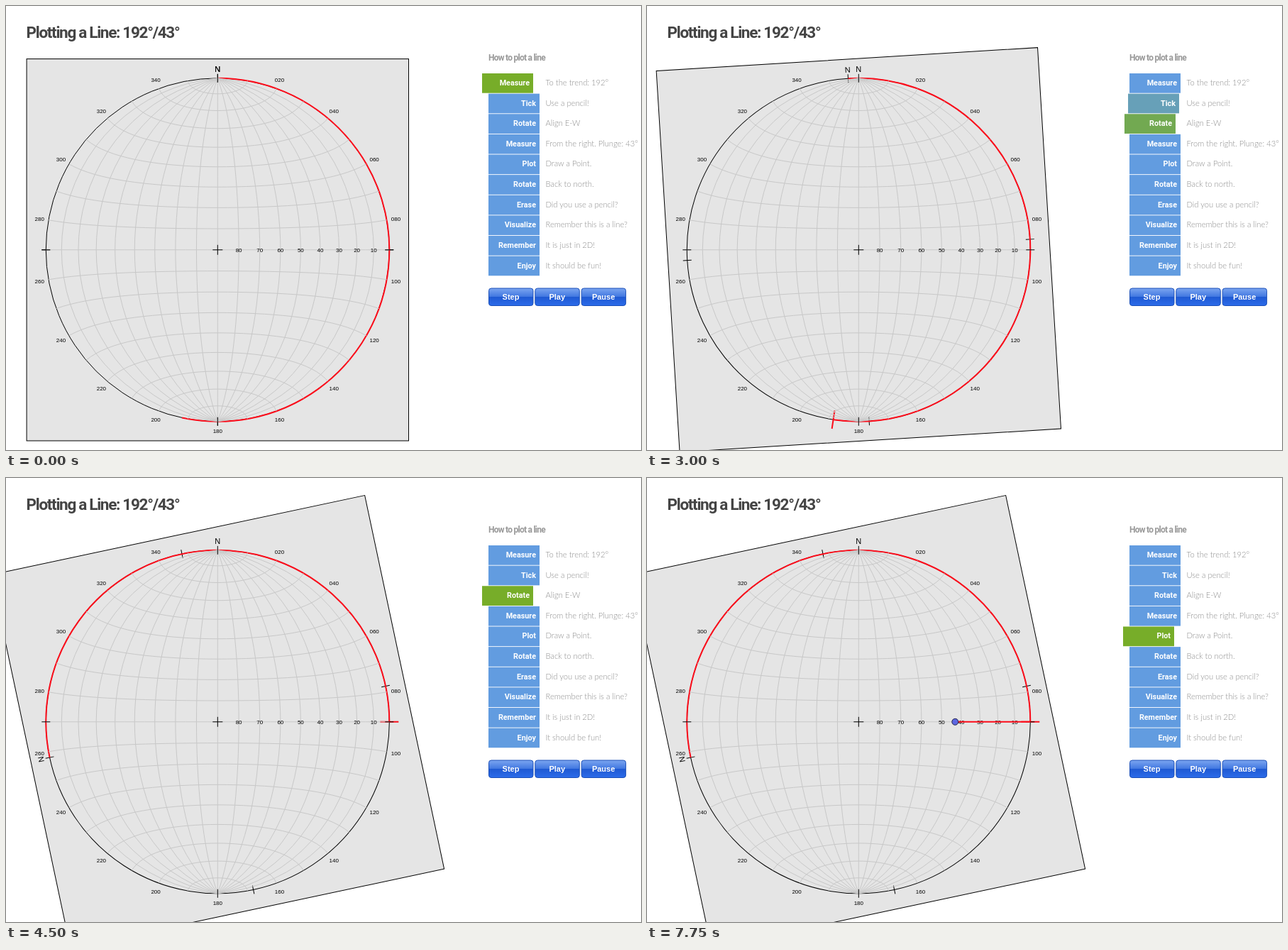
These frames come from a looping animation (895x626 px, 8 s). An HTML page:

```html
<!DOCTYPE html>
<html lang="en">
<head>
<meta charset="utf-8">
<title>Plotting a Line</title>
<style>
  html, body { margin: 0; height: 100%; overflow: hidden; background: #fff; }
  svg { display: block; }
  text { font-family: "Liberation Sans", Arial, sans-serif; }
  .title { font: 600 22.5px Roboto, sans-serif; letter-spacing: -1.3px; fill: #444; }
  .heading { font: 700 12px Roboto, sans-serif; letter-spacing: -.75px; fill: #999; }
  .label { font: 700 10.8px Roboto, sans-serif; fill: #fff; text-anchor: end; }
  .hint { font: 300 11.2px Lato, sans-serif; fill: #8c8c8c; }
  .button { font-size: 11px; font-weight: 700; fill: #fff; text-anchor: middle; }
  .degree { font-size: 8px; text-anchor: middle; }
  .north { font-size: 11px; text-anchor: middle; }
  .grid { fill: none; stroke: #c8c8c8; }
  .ink { fill: none; stroke: #000; }
  .red { fill: none; stroke: #fc0d1b; stroke-width: 2; }
</style>
</head>
<body>
<svg width="895" height="626" viewBox="0 0 895 626">
  <defs>
    <linearGradient id="gloss" x2="0" y2="1">
      <stop offset="0" stop-color="#7ba5f0"/>
      <stop offset=".5" stop-color="#3f76e0"/>
      <stop offset=".5" stop-color="#1f59d2"/>
      <stop offset="1" stop-color="#2c6cea"/>
    </linearGradient>
  </defs>
  <g transform="translate(298.3 343.8)">
    <g id="sheet"></g>
    <g id="net"></g>
    <path id="plunge" class="red"/>
    <circle id="point" cx="136" r="4.5" fill="#5c66e0" stroke="#26264a"/>
  </g>
  <text class="title" x="28.5" y="45">Plotting a Line: 192°/43°</text>
  <text class="heading" x="680" y="76.5">How to plot a line</text>
  <g id="menu"></g>
  <g id="buttons"></g>
</svg>
<script>
const LOOP = 8000, SAMPLE = 250, MOVE = 1440;
const R = 242, TREND = 192, PLUNGE_LENGTH = 106;
const TICK_OUTER = 255, TICK_INNER = 229;
const MENU_START = 555, MENU_STEP = 2250, MENU_FADE = 250;
const BLUE = [98, 156, 224], GREEN = [119, 173, 41];
const steps = [
  ['Measure', 'To the trend: 192°'], ['Tick', 'Use a pencil!'],
  ['Rotate', 'Align E-W'], ['Measure', 'From the right. Plunge: 43°'],
  ['Plot', 'Draw a Point.'], ['Rotate', 'Back to north.'],
  ['Erase', 'Did you use a pencil?'], ['Visualize', 'Remember this is a line?'],
  ['Remember', 'It is just in 2D!'], ['Enjoy', 'It should be fun!']
];

const byId = id => document.getElementById(id);
const rad = degrees => degrees * Math.PI / 180;
const polar = (r, azimuth) => [r * Math.sin(rad(azimuth)), -r * Math.cos(rad(azimuth))];
const range = (from, to, step) =>
  Array.from({ length: Math.floor((to - from) / step) + 1 }, (_, i) => from + i * step);
const path = (cls, d) => `<path class="${cls}" d="${d}"/>`;
const text = (cls, x, y, s) => `<text class="${cls}" x="${x}" y="${y}">${s}</text>`;
const polyline = points => 'M' + points.map(p => p.map(v => v.toFixed(2))).join('L');

// Lambert equal-area projection of the lower hemisphere
function project(lat, lon) {
  const [f, l] = [rad(lat), rad(lon)];
  const k = R / Math.sqrt(1 + Math.cos(f) * Math.cos(l));
  return [k * Math.cos(f) * Math.sin(l), -k * Math.sin(f)];
}

const rimTicks = path('ink', 'M0-248V-236M0 236V248M-248 0H-236M236 0H248');
const north = text('north', 0, -250.5, 'N');

function buildNet() {
  const arcs = range(-80, 80, 10).map(a =>
    polyline(range(-90, 90, 5).map(b => project(b, a))) +
    polyline(range(-90, 90, 5).map(b => project(a, b)))).join('');
  const rim = range(20, 340, 20).map(a => {
    const [x, y] = polar(TICK_OUTER, a);
    return text('degree', x, y + 3, String(a).padStart(3, '0'));
  });
  const dips = range(10, 80, 10).map(a => text('degree', project(0, 90 - a)[0], 3, a));
  return path('grid', arcs) + rim.join('') + dips.join('') + north + rimTicks +
    path('ink', 'M-7 0H7M0-7V7');
}

function buildSheet() {
  return `<rect class="ink" x="-269.2" y="-269.2" width="538.4" height="538.4" style="fill:#e5e5e5"/>
    <circle class="ink" r="${R}"/>` + north + rimTicks +
    path('red', `M0 ${-R}A${R} ${R} 0 1 1 ${polar(R, TREND)}`) +
    '<path id="tick" class="red"/>';
}

function buildMenu() {
  return steps.map(([label, hint], i) => {
    const y = 95 + 28.62 * i;
    return `<g><rect x="680" y="${y}" width="72" height="27.7"/>${text('label', 747, y + 17, label)}</g>` +
      text('hint', 760.5, y + 17, hint);
  }).join('');
}

function buildButtons() {
  return ['Step', 'Play', 'Pause'].map((label, i) => {
    const x = 680.5 + 65.3 * i;
    return `<rect x="${x}" y="398" width="62.5" height="24.5" rx="3.5" fill="url(#gloss)" stroke="#1b4fb8"/>` +
      text('button', x + 31, 414, label);
  }).join('');
}

byId('net').innerHTML = buildNet();
byId('sheet').innerHTML = buildSheet();
byId('menu').innerHTML = buildMenu();
byId('buttons').innerHTML = buildButtons();
const rows = byId('menu').querySelectorAll('g');

function ease(t, start) {
  const u = Math.min(1, Math.max(0, (t - start) / MOVE));
  return (1 - Math.cos(Math.PI * u)) / 2;
}

function drawMenu(t) {
  const since = t - MENU_START;
  const current = since < 0 ? 0 : Math.floor(since / MENU_STEP) + 1;
  const shown = current ? Math.min(1, since % MENU_STEP / MENU_FADE) : 1;
  rows.forEach((row, i) => {
    const active = i === current ? shown : i === current - 1 ? 1 - shown : 0;
    const color = BLUE.map((c, j) => Math.round(c + (GREEN[j] - c) * active));
    row.setAttribute('transform', `translate(${-9 * active} 0)`);
    row.firstChild.setAttribute('fill', `rgb(${color})`);
  });
}

function draw(t) {
  const drawn = ease(t, 455), turned = ease(t, 2829), measured = ease(t, 5049);
  const tip = TICK_OUTER + (TICK_INNER - TICK_OUTER) * drawn;
  byId('tick').setAttribute('d', drawn > .01 ? polyline([polar(TICK_OUTER, TREND), polar(tip, TREND)]) : '');
  byId('sheet').setAttribute('transform', `rotate(${(90 - TREND) * turned})`);
  byId('plunge').setAttribute('d', measured ? `M${R} 0H${R - PLUNGE_LENGTH * measured}` : '');
  byId('point').setAttribute('visibility', t >= 7500 ? 'visible' : 'hidden');
  drawMenu(t);
}

// The picture advances four times a second
function tick() {
  draw(Math.floor(performance.now() % LOOP / SAMPLE) * SAMPLE);
  requestAnimationFrame(tick);
}
tick();
</script>
</body>
</html>
```
